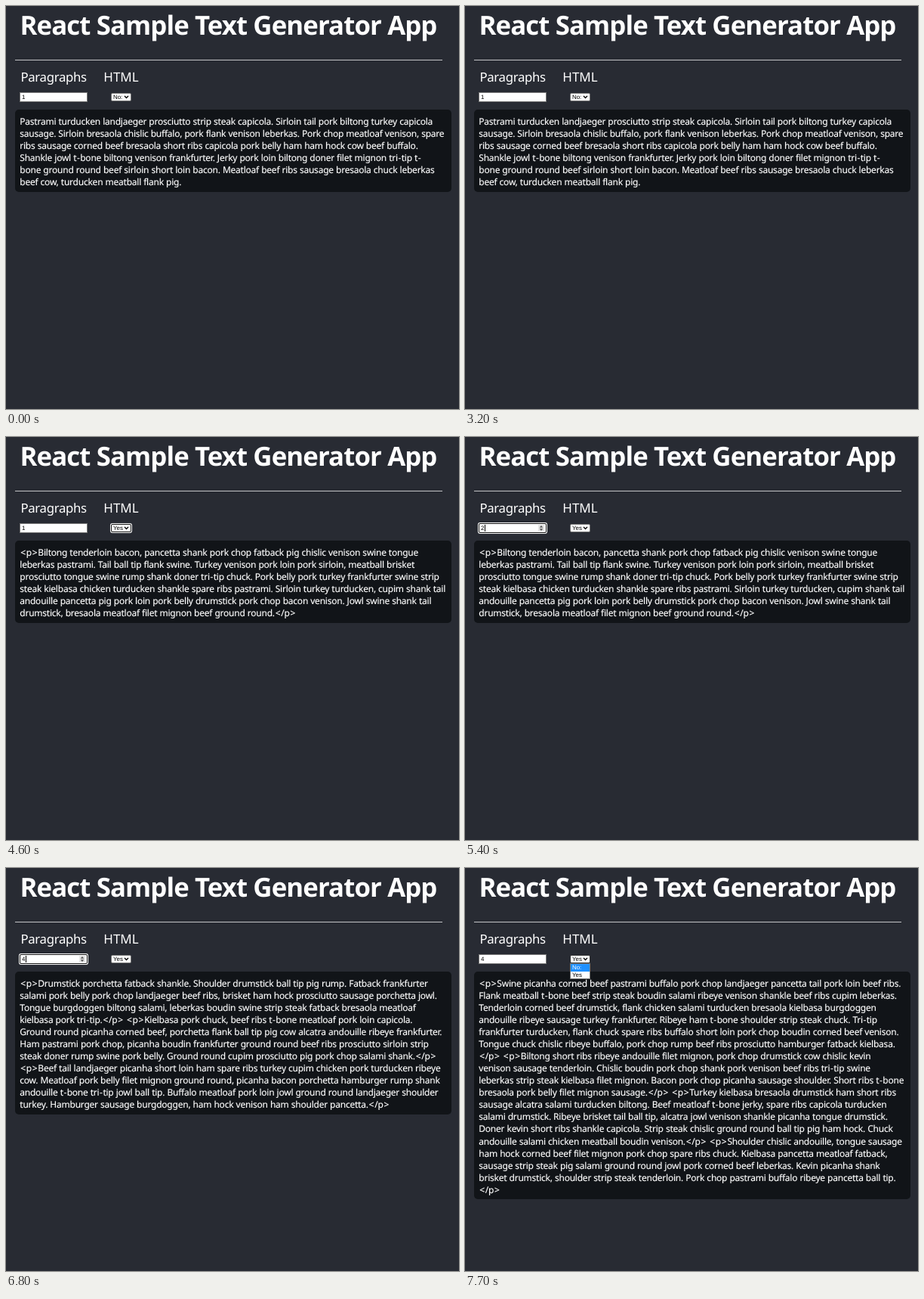
Recreate the animation shown at these times as an HTML page. Size 600 by 533 pixels, loop 8 s.

```html
<!DOCTYPE html>
<html lang="en">
<head>
<meta charset="utf-8">
<title>React Sample Text Generator App</title>
<style>
  html, body { margin: 0; width: 100%; height: 100%; overflow: hidden; background: #282b33; }
  body { position: relative; color: #fff; font-family: "Noto Sans", sans-serif; text-rendering: geometricPrecision; }
  body > * { position: absolute; box-sizing: border-box; margin: 0; white-space: pre; }

  h1 { left: 0; top: 5.8px; width: 589px; font-size: 34.8px; line-height: 40px; text-align: center; letter-spacing: -.9px; }
  hr { left: 12px; top: 71px; width: 566px; height: 1px; border: 0; background: #c3c4c7; }
  .label { top: 84px; line-height: 20px; }
  #countLabel { left: 19.5px; font-size: 16.8px; letter-spacing: -.35px; }
  #htmlLabel { left: 129.3px; font-size: 17px; }

  .control { background: #fff; color: #000; border: 1px solid #767676; font: 7.9px "Liberation Sans", sans-serif; }
  .control.hover { border-color: #333; }
  .control.focus { border-color: #101010; box-shadow: 0 0 0 1px #fff; border-radius: 2px; }
  #count { left: 18px; top: 114px; width: 90px; height: 13px; padding-left: 2px; line-height: 11px; }
  #caret { position: absolute; left: 6.5px; top: 1px; width: 1px; height: 9px; background: #000; }
  #spinner { position: absolute; right: 2px; top: 1px; width: 8px; height: 9px; background: #e6e6e6; }
  #select { left: 139px; top: 114.7px; width: 27px; height: 11.6px; padding-left: 2px; line-height: 9.6px; border-radius: 2px; }
  #select svg { position: absolute; right: 2px; top: 2.8px; }
  #list { left: 139px; top: 126px; width: 27px; height: 21px; z-index: 1; line-height: 10px; }
  #list div { padding-left: 2px; height: 9.5px; line-height: 9.5px; }
  #list .active { background: #1e90ff; color: #fff; }

  #panel { left: 12.4px; top: 137.3px; width: 577.6px; padding: 7.4px 0 4.6px 5.9px; border-radius: 5px; background: #111418;
           font-size: 12px; line-height: 16.06px; letter-spacing: -.232px; word-spacing: .3px; -webkit-text-stroke: .15px #fff; }
  .bracket { margin: 0 .92px; }
  .hyphen { margin: 0 .65px; }
</style>
</head>
<body>
<h1>React Sample Text Generator App</h1>
<hr>
<div class="label" id="countLabel">Paragraphs</div>
<div class="label" id="htmlLabel">HTML</div>
<div class="control" id="count"><span id="value"></span><span id="caret"></span><svg id="spinner" viewBox="0 0 8 9"><path d="M1.6 3.7 4 1.1 6.4 3.7zM1.6 5.3 4 7.9 6.4 5.3z" fill="#555"/></svg></div>
<div class="control" id="select"><span id="choice"></span><svg width="7" height="5"><path d="M1 1 3.5 3.5 6 1" fill="none" stroke="#000" stroke-width="1.4"/></svg></div>
<div class="control" id="list"><div>No:</div><div>Yes</div></div>
<div id="panel"></div>
<script>
const LOOP = 8000;
const texts = [
`Pastrami turducken landjaeger prosciutto strip steak capicola. Sirloin tail pork biltong turkey capicola
sausage. Sirloin bresaola chislic buffalo, pork flank venison leberkas. Pork chop meatloaf venison, spare
ribs sausage corned beef bresaola short ribs capicola pork belly ham ham hock cow beef buffalo.
Shankle jowl t-bone biltong venison frankfurter. Jerky pork loin biltong doner filet mignon tri-tip t-
bone ground round beef sirloin short loin bacon. Meatloaf beef ribs sausage bresaola chuck leberkas
beef cow, turducken meatball flank pig.`,

`<p>Biltong tenderloin bacon, pancetta shank pork chop fatback pig chislic venison swine tongue
leberkas pastrami. Tail ball tip flank swine. Turkey venison pork loin pork sirloin, meatball brisket
prosciutto tongue swine rump shank doner tri-tip chuck. Pork belly pork turkey frankfurter swine strip
steak kielbasa chicken turducken shankle spare ribs pastrami. Sirloin turkey turducken, cupim shank tail
andouille pancetta pig pork loin pork belly drumstick pork chop bacon venison. Jowl swine shank tail
drumstick, bresaola meatloaf filet mignon beef ground round.</p>`,

`<p>Hamburger pig picanha bacon fatback tail. Corned beef t-bone tri-tip alcatra tenderloin hamburger
jowl burgdoggen. Jerky pig andouille filet mignon ball tip, t-bone tri-tip picanha short ribs leberkas
turkey shank spare ribs. Strip steak meatloaf fatback hamburger bacon alcatra chislic beef beef ribs
cupim jerky short loin shankle biltong meatball. Doner drumstick sausage ball tip, chislic short loin
buffalo. Porchetta tenderloin burgdoggen ham ham hock, fatback pork loin sausage.</p>
<p>Frankfurter cupim prosciutto jowl capicola shank. Short loin sausage doner buffalo pork belly pig
pastrami beef ribs capicola kielbasa ham tenderloin. Jowl tri-tip meatball, brisket shank pastrami pig
jerky landjaeger kevin ham hock shankle doner cow. T-bone chicken short loin hamburger pig jerky
swine kielbasa buffalo capicola shankle.</p>`,

`<p>Drumstick porchetta fatback shankle. Shoulder drumstick ball tip pig rump. Fatback frankfurter
salami pork belly pork chop landjaeger beef ribs, brisket ham hock prosciutto sausage porchetta jowl.
Tongue burgdoggen biltong salami, leberkas boudin swine strip steak fatback bresaola meatloaf
kielbasa pork tri-tip.</p> <p>Kielbasa pork chuck, beef ribs t-bone meatloaf pork loin capicola.
Ground round picanha corned beef, porchetta flank ball tip pig cow alcatra andouille ribeye frankfurter.
Ham pastrami pork chop, picanha boudin frankfurter ground round beef ribs prosciutto sirloin strip
steak doner rump swine pork belly. Ground round cupim prosciutto pig pork chop salami shank.</p>
<p>Beef tail landjaeger picanha short loin ham spare ribs turkey cupim chicken pork turducken ribeye
cow. Meatloaf pork belly filet mignon ground round, picanha bacon porchetta hamburger rump shank
andouille t-bone tri-tip jowl ball tip. Buffalo meatloaf pork loin jowl ground round landjaeger shoulder
turkey. Hamburger sausage burgdoggen, ham hock venison ham shoulder pancetta.</p>`,

`<p>Swine picanha corned beef pastrami buffalo pork chop landjaeger pancetta tail pork loin beef ribs.
Flank meatball t-bone beef strip steak boudin salami ribeye venison shankle beef ribs cupim leberkas.
Tenderloin corned beef drumstick, flank chicken salami turducken bresaola kielbasa burgdoggen
andouille ribeye sausage turkey frankfurter. Ribeye ham t-bone shoulder strip steak chuck. Tri-tip
frankfurter turducken, flank chuck spare ribs buffalo short loin pork chop boudin corned beef venison.
Tongue chuck chislic ribeye buffalo, pork chop rump beef ribs prosciutto hamburger fatback kielbasa.
</p> <p>Biltong short ribs ribeye andouille filet mignon, pork chop drumstick cow chislic kevin
venison sausage tenderloin. Chislic boudin pork chop shank pork venison beef ribs tri-tip swine
leberkas strip steak kielbasa filet mignon. Bacon pork chop picanha sausage shoulder. Short ribs t-bone
bresaola pork belly filet mignon sausage.</p> <p>Turkey kielbasa bresaola drumstick ham short ribs
sausage alcatra salami turducken biltong. Beef meatloaf t-bone jerky, spare ribs capicola turducken
salami drumstick. Ribeye brisket tail ball tip, alcatra jowl venison shankle picanha tongue drumstick.
Doner kevin short ribs shankle capicola. Strip steak chislic ground round ball tip pig ham hock. Chuck
andouille salami chicken meatball boudin venison.</p> <p>Shoulder chislic andouille, tongue sausage
ham hock corned beef filet mignon pork chop spare ribs chuck. Kielbasa pancetta meatloaf fatback,
sausage strip steak pig salami ground round jowl pork corned beef leberkas. Kevin picanha shank
brisket drumstick, shoulder strip steak tenderloin. Pork chop pastrami buffalo ribeye pancetta ball tip.
</p>`];

// Each track lists [start time, state]; a state holds until the next one.
const tracks = {
  text: [[0, 0], [4500, 1], [5600, 2], [6200, 3], [6900, 4]],
  value: [[0, 1], [5300, 2], [5900, 3], [6500, 4]],
  choice: [[0, 'No:'], [4200, 'Yes']],
  hover: [[0, ''], [800, 'count'], [900, 'select'], [1000, ''], [3300, 'select'], [4700, 'count'], [7100, 'select']],
  focus: [[0, ''], [4200, 'select'], [5300, 'count'], [7200, '']],
  active: [[0, -1], [3600, 0], [3900, 1], [4200, -1], [7300, 1], [7600, 0]]
};
const $ = id => document.getElementById(id);
const stateAt = (track, t) => track.findLast(([start]) => start <= t)[1];
const show = (id, on) => $(id).style.display = on ? '' : 'none';

const markup = text => text.replace(/[<>-]/g, c =>
  `<span class="${c === '-' ? 'hyphen' : 'bracket'}">${c === '<' ? '&lt;' : c}</span>`);
const pages = texts.map(markup);
let shownText;

function draw(t) {
  const s = {};
  for (const name in tracks) s[name] = stateAt(tracks[name], t);

  if (s.text !== shownText) $('panel').innerHTML = pages[shownText = s.text];
  $('value').textContent = s.value;
  $('choice').textContent = s.choice;
  for (const id of ['count', 'select']) {
    $(id).classList.toggle('hover', s.hover === id);
    $(id).classList.toggle('focus', s.focus === id);
  }
  show('caret', s.focus === 'count');
  show('spinner', s.hover === 'count');
  show('list', s.active >= 0);
  [...$('list').children].forEach((row, i) => row.classList.toggle('active', i === s.active));
}

function tick() {
  draw(performance.now() % LOOP);
  requestAnimationFrame(tick);
}
tick();
</script>
</body>
</html>
```
